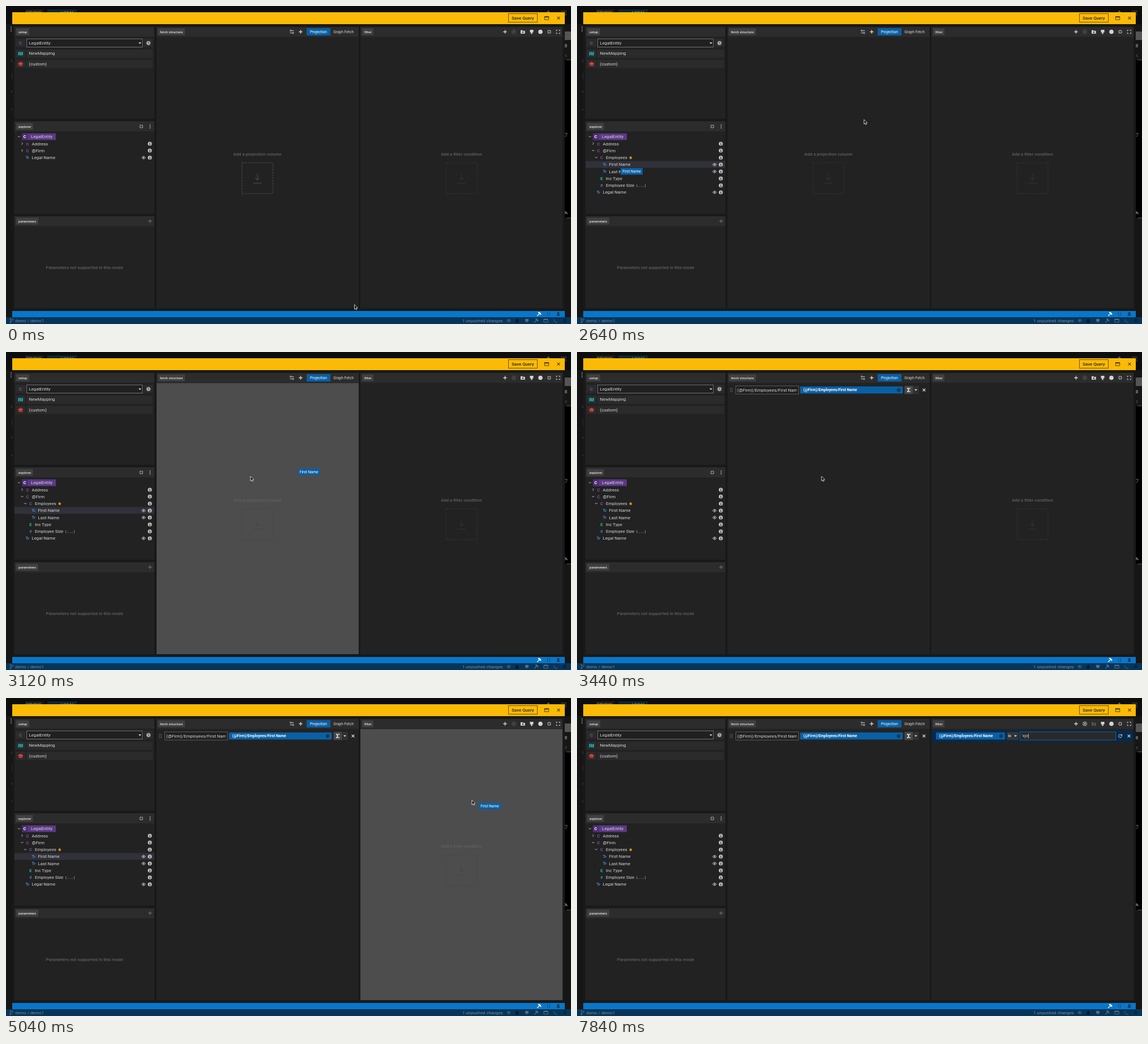
These frames come from a looping animation (998 by 561 pixels, 8 s). An HTML page:

```html
<!DOCTYPE html>
<html lang="en">
<head>
<meta charset="utf-8">
<title>Query builder</title>
<style>
html, body { margin: 0; width: 100%; height: 100%; overflow: hidden; background: #0d0d0d; }
svg { display: block; width: 998px; height: 561px; font: 7.8px Roboto, sans-serif; }
text { fill: #d6d6d6; white-space: pre; }
[class] { animation: none 8s step-end infinite; }

.s { font-size: 6.66px; }
.xs { font-size: 6.1px; font-weight: 500; fill: #e2e2e2; }
.m { font-weight: 500; }
.b { font-weight: 700; }
.mid { text-anchor: middle; }
.hint { fill: #606060; font-weight: 500; text-anchor: middle; }
.type { font-weight: 500; text-anchor: middle; }
.line { fill: none; stroke: currentColor; }
.mono { font: 6.1px "DejaVu Sans Mono", monospace; }

/* one percent is 80 ms */
.on10 { animation-name: on10; }
.on15 { animation-name: on15; }
.on42 { animation-name: on42; }
.on67 { animation-name: on67; }
.on76 { animation-name: on76; }
.on82 { animation-name: on82; }
.on88 { animation-name: on88; }
.on93 { animation-name: on93; }
.on95 { animation-name: on95; }
.on98 { animation-name: on98; }
.off10 { animation-name: off10; }
.off42 { animation-name: off42; }
.off67 { animation-name: off67; }
.off76 { animation-name: off76; }
.off82 { animation-name: off82; }
.at10to15 { animation-name: at10to15; }
@keyframes on10 { 0% { visibility: hidden } 10% { visibility: visible } }
@keyframes on15 { 0% { visibility: hidden } 15% { visibility: visible } }
@keyframes on42 { 0% { visibility: hidden } 42% { visibility: visible } }
@keyframes on67 { 0% { visibility: hidden } 67% { visibility: visible } }
@keyframes on76 { 0% { visibility: hidden } 76% { visibility: visible } }
@keyframes on82 { 0% { visibility: hidden } 82% { visibility: visible } }
@keyframes on88 { 0% { visibility: hidden } 88% { visibility: visible } }
@keyframes on93 { 0% { visibility: hidden } 93% { visibility: visible } }
@keyframes on95 { 0% { visibility: hidden } 95% { visibility: visible } }
@keyframes on98 { 0% { visibility: hidden } 98% { visibility: visible } }
@keyframes off10 { 10%, 100% { visibility: hidden } }
@keyframes off42 { 42%, 100% { visibility: hidden } }
@keyframes off67 { 67%, 100% { visibility: hidden } }
@keyframes off76 { 76%, 100% { visibility: hidden } }
@keyframes off82 { 82%, 100% { visibility: hidden } }
@keyframes at10to15 { 0%, 15%, 100% { visibility: hidden } 10% { visibility: visible } }

.types { animation-name: types; }
.legal { animation-name: legal; }
.hover { animation-name: hover; }
.dash { animation-name: dash; }
.over-fetch { animation-name: over-fetch; }
.over-filter { animation-name: over-filter; }
.tag { animation-name: tag; }
.pointer { animation-name: pointer; }
.arrow { animation-name: arrow; }
.hand { animation-name: hand; }
.ibeam { animation-name: ibeam; }
@keyframes types {
  0% { visibility: hidden; transform: translateY(-24.5px) }
  10% { visibility: visible; transform: translateY(-24.5px) }
  15% { visibility: visible; transform: none }
}
@keyframes legal {
  0% { transform: translateY(-61.2px) }
  10% { transform: translateY(-24.5px) }
  15% { transform: none }
}
@keyframes hover {
  0% { visibility: hidden }
  5% { visibility: visible; transform: translateY(-24.5px) }
  12% { visibility: visible; transform: translateY(-12.2px) }
  20%, 51% { visibility: visible; transform: none }
  42%, 67%, 100% { visibility: hidden; transform: none }
}
@keyframes dash { 0% { color: #404040 } 15%, 100% { color: #2f2f2f } }
@keyframes over-fetch {
  0%, 36%, 42%, 63%, 100% { visibility: hidden }
  34%, 39%, 60% { visibility: visible }
}
@keyframes over-filter {
  0%, 39%, 67%, 100% { visibility: hidden }
  36%, 63% { visibility: visible }
}
@keyframes tag {
  0%, 42%, 67%, 100% { visibility: hidden }
  29% { visibility: visible; transform: translate(77px, 286px) }
  34% { visibility: visible; transform: translate(402px, 227px) }
  35% { visibility: visible; transform: translate(518px, 206px) }
  36% { visibility: visible; transform: translate(652px, 190px) }
  37% { visibility: visible; transform: translate(672px, 190px) }
  38% { visibility: visible; transform: translate(632px, 197px) }
  39% { visibility: visible; transform: translate(515.5px, 205.5px) }
  40% { visibility: visible; transform: translate(444px, 224px) }
  58% { visibility: visible; transform: translate(95px, 288px) }
  60% { visibility: visible; transform: translate(305px, 249px) }
  61% { visibility: visible; transform: translate(652px, 210px) }
  63% { visibility: visible; transform: translate(835px, 185px) }
}
@keyframes pointer {
  0% { transform: translate(615px, 526.5px) }
  2% { transform: translate(250px, 404px) }
  4% { transform: translate(70px, 300px) }
  5% { transform: translate(11px, 262px) }
  6% { transform: translate(20px, 256px) }
  7% { transform: translate(27px, 253px) }
  11% { transform: translate(30px, 259px) }
  12% { transform: translate(33px, 264px) }
  19% { transform: translate(38px, 267px) }
  20% { transform: translate(46px, 274px) }
  21% { transform: translate(53px, 277px) }
  22% { transform: translate(59px, 279px) }
  23% { transform: translate(63px, 280px) }
  24% { transform: translate(65px, 280.5px) }
  29% { transform: translate(90px, 276px) }
  30% { transform: translate(160px, 262px) }
  31% { transform: translate(260px, 243px) }
  32% { transform: translate(390px, 222px) }
  33% { transform: translate(506.5px, 200px) }
  34% { transform: translate(580px, 190px) }
  35% { transform: translate(640px, 185px) }
  36% { transform: translate(660px, 185px) }
  37% { transform: translate(620px, 192px) }
  38% { transform: translate(504px, 200px) }
  39% { transform: translate(431.5px, 219px) }
  44% { transform: translate(420px, 224px) }
  45% { transform: translate(380px, 232px) }
  46% { transform: translate(320px, 244px) }
  47% { transform: translate(250px, 257px) }
  48% { transform: translate(180px, 270px) }
  49% { transform: translate(130px, 278px) }
  50% { transform: translate(105px, 281px) }
  52% { transform: translate(88px, 281px) }
  53% { transform: translate(84px, 281px) }
  57% { transform: translate(88px, 281px) }
  58% { transform: translate(300px, 246px) }
  59% { transform: translate(640px, 205px) }
  60% { transform: translate(822.5px, 180px) }
  68% { transform: translate(830px, 166px) }
  69% { transform: translate(850px, 130px) }
  70% { transform: translate(870px, 98px) }
  71% { transform: translate(877.5px, 84px) }
  74% { transform: translate(870px, 70px) }
  75% { transform: translate(864px, 67px) }
}
@keyframes arrow {
  0%, 26%, 57% { visibility: visible }
  7%, 50%, 74%, 100% { visibility: hidden }
}
@keyframes hand {
  0%, 26%, 57%, 100% { visibility: hidden }
  7%, 50% { visibility: visible }
}
@keyframes ibeam { 0%, 82%, 100% { visibility: hidden } 74% { visibility: visible } }
</style>
</head>
<body>
<svg viewBox="0 0 998 561">
<defs>
  <path id="right" class="line" d="M-1-2 1 0-1 2"/>
  <path id="down" class="line" d="M-2-1 0 1 2-1"/>
  <path id="plus" class="line" stroke-width="1.3" d="M-3.2 0H3.2M0-3.2V3.2"/>
  <path id="cross" class="line" stroke-width="1.2" d="M-2.4-2.4 2.4 2.4M2.4-2.4-2.4 2.4"/>
  <path id="caret" fill="currentColor" d="M-2.5-1.2H2.5L0 1.5z"/>
  <g id="info">
    <circle r="3.5" fill="currentColor"/>
    <path d="M-.9-.3H.4V1.8M-1 1.9H1.1M-.5-1.9H.5" fill="none" stroke="#222" stroke-width=".9"/>
  </g>
  <g id="eye" class="line" stroke-width=".9">
    <path d="M-3.5 0Q0-4.8 3.5 0Q0 4.8-3.5 0z"/><circle r="1" fill="currentColor"/>
  </g>
  <g id="act"><use href="#eye" x="243"/><use href="#info" x="254"/></g>
  <g id="string" fill="#4688cf">
    <path d="M-3.2-2.5H1V-1.5H-.6V2.6H-1.7V-1.5H-3.2z"/><path d="M.7-.6H1.7V0Q2.2-.7 3.2-.6V.4Q1.8.3 1.8 1.4V2.6H.7z"/>
  </g>
  <g id="compress" class="line"><path d="M-3.3-1.2H-1.2V-3.3M3.3-1.2H1.2V-3.3M-3.3 1.2H-1.2V3.3M3.3 1.2H1.2V3.3"/></g>
  <g id="hammer" class="line"><path stroke-width="1.3" d="M-3.2 3.3 1.4-1.4"/><path stroke-width="2.2" d="M-1.4-2.4Q1-3.6 3.3 1"/></g>
  <g id="window"><path class="line" d="M-3.7-2.7H3.7V2.8H-3.7z"/><path fill="currentColor" d="M-3.7-3H3.7V-1H-3.7z"/></g>
  <path id="reload" class="line" d="M2.1-1.8A2.8 2.8 0 1 0 2.8.5M3-3.2V-.9H.7"/>
  <path id="robot" fill="currentColor" d="M-3 3Q-3 .6-1.5.4Q-3-3.4 0-3.4T1.5.4Q3 .6 3 3z"/>
  <g id="drop">
    <rect class="line" x="-27" y="15.5" width="54.5" height="54.5" stroke-width="1.5" stroke-dasharray="3.3 1.7"/>
    <path class="line" stroke-width="1.5" d="M0 34.5V46M-4 42 0 46 4 42M-7.5 51.5H7.5"/>
  </g>
  <clipPath id="name-clip"><rect x="281" y="60" width="107.4" height="14"/></clipPath>
</defs>

<!-- dimmed page behind -->
<g color="#62696f">
  <path fill="#1c1c1c" d="M34 6H66V11H34z"/><path fill="#08263c" d="M73 6H125V11H73z"/>
  <text x="35" y="14.4" class="b" style="fill:#777">STUDIO</text>
  <text x="97" y="14.4" class="b" style="fill:#777">LOCAL</text>
  <path fill="#161616" d="M0 32H11V549H0zM987 32H998V549H987z"/>
  <path fill="#777" d="M8 36h2v2H8zM8 39.5h2v2H8zM8 43h2v2H8z"/>
  <path fill="#2d2d2d" d="M9 94h2v5H9zM10 118h1v11h-1zM9 149h2v4H9zM9 181h2v3H9z"/>
  <path fill="#5a5a5a" d="M955 11 958 7.5 961 11zM980 8.5H990V9.5H980zM980 11.7H990V12.7H980zM980 15H990V16H980z"/>
  <path fill="#555" d="M987 45H998V60H987z"/>
  <path fill="#000" d="M987 95H998V374H987z"/>
  <path fill="#5a5a5a" d="M987 67h4v6h-4zM990 94.5h8v1h-8zM990 373.5h8v1h-8z"/>
  <path class="line" d="M990.5 85 988 87.5 990.5 90"/>
  <use href="#reload" x="988" y="227"/><use href="#hammer" x="988" y="366"/>
  <path fill="#06355a" d="M0 549H998V561H0z"/>
  <g class="line" stroke-width=".9">
    <circle cx="8" cy="552.2" r="1.2"/><circle cx="8" cy="558" r="1.2"/><circle cx="11.7" cy="553.2" r="1.2"/>
    <path d="M8 553.5V556.8M11.7 554.5Q11.5 556 8 556.5"/>
  </g>
  <text x="16" y="557.8" style="fill:#82898f">demo / demo1</text>
  <text x="806" y="557.8" style="fill:#82898f">1 unpushed changes</text>
  <use href="#eye" x="888" y="555"/>
  <path fill="#0b1a26" d="M903 551Q909 559 903 559T903 551z"/>
  <path fill="currentColor" d="M917 552H923V556.5H921.5L920 558.5 918.5 556.5H917z"/>
  <use href="#hammer" x="936.5" y="555"/><use href="#window" x="953.5" y="555"/>
  <path class="line" stroke="#0b2338" d="M967 552.5 969.5 555 967 557.5M970 558H974"/>
  <use href="#robot" x="987" y="555" color="#0b2338"/>
</g>

<!-- dialog -->
<path fill="#191919" d="M11 32H987V538H11z"/>
<path fill="#fbba05" d="M11 11H987V32H11z"/>
<path fill="#0877ca" d="M11 538H987V549H11z"/>
<rect x="887.5" y="13.5" width="51" height="15" fill="none" stroke="#6b5410"/>
<text x="913" y="24" class="m mid" style="fill:#2b2410">Save Query</text>
<g color="#544107"><use href="#window" x="955" y="21.3"/><use href="#cross" x="976" y="21.3"/></g>
<use href="#hammer" x="941.5" y="543.5" color="#fff"/>
<text x="958.5" y="546" class="s mid" style="fill:#0c3b63">{ }</text>
<use href="#robot" x="975.5" y="543.5" color="#0c3b63"/>

<path fill="#222" d="M15 37H262V199H15zM15 203H262V366.500H15zM15 370.500H262V533H15zM266 37H623V533H266zM626 37H983V533H626z"/>
<path fill="#2c2c2c" d="M15 37H262V54H15zM15 203.500H262V221H15zM15 371H262V388.500H15zM266 37H623V54.500H266zM626 37H983V54.500H626z"/>
<path fill="#404040" d="M18 39.500H41V51.500H18zM18 206.500H47.500V218.500H18zM18 373.500H57V385.500H18zM268.500 39.500H316V51.500H268.500zM629 39.500H649V51.500H629z"/>
<g class="xs">
  <text x="22" y="47.500" class="xs">setup</text>
  <text x="22" y="214.500" class="xs">explorer</text>
  <text x="22" y="381.500" class="xs">parameters</text>
  <text x="272" y="47.500" class="xs">fetch structure</text>
  <text x="633" y="47.500" class="xs">filter</text>
</g>

<!-- setup -->
<path fill="#2b2b2b" d="M17 58H34V72H17zM17 77H34V91H17zM17 95H34V109H17zM36 77H259.500V91.500H36zM36 95H259.500V109.500H36zM244 58H259.500V72.500H244z"/>
<rect x="36.500" y="58" width="204.500" height="14.500" fill="#202020" stroke="#737373"/>
<text x="25.500" y="67.800" class="type" style="fill:#8a55bd">C</text>
<text x="40.500" y="68">LegalEntity</text><use href="#caret" x="236.500" y="65.500" color="#ddd"/>
<text x="40.500" y="86.400">NewMapping</text><text x="40.500" y="104.600">(custom)</text>
<path fill="#18a3a8" d="M21.500 81.500 24 80.500V86.500L21.500 87.500zM24.500 80.500 27 81.500V87.500L24.500 86.500zM27.500 81.500 30 80.500V86.500L27.500 87.500z"/>
<path fill="#e03c3c" d="M21.500 102Q21.500 99.500 24 100Q25 97.500 27.500 99.500Q30 100 30 103H21.500zM22.500 103.500H29V105.500H22.500z"/>
<circle cx="251.700" cy="65.300" r="3.600" fill="#a8a8a8"/><path d="M251.700 63V65.500L253.300 66.500" fill="none" stroke="#2b2b2b" stroke-width=".8"/>

<!-- explorer -->
<g color="#bcbcbc"><use href="#compress" x="239" y="212.500"/><path fill="currentColor" d="M253.800 209h1.500v1.500h-1.500zM253.800 211.800h1.500v1.500h-1.500zM253.800 214.600h1.500v1.500h-1.500z"/></g>
<rect class="hover" x="15" y="273.400" width="247" height="12.200" fill="#31313a"/>
<g color="#c4c4c4">
  <use href="#down" x="23" y="230.500"/>
  <path fill="#5c3886" d="M28 224.800H88V236.500H28z"/><path fill="#4c2d72" d="M28 224.800H38.500V236.500H28z"/>
  <text x="33" y="233.300" class="b mid" style="fill:#fff">C</text>
  <text x="44" y="233.300">LegalEntity</text>

  <use href="#right" x="28.500" y="242.700"/><text x="38" y="245.500" class="type" style="fill:#8a55bd">C</text>
  <text x="45.500" y="245.500">Address</text><use href="#info" x="254" y="243"/>

  <use href="#right" x="28.500" y="255" class="off10"/><use href="#down" x="28.500" y="255" class="on10"/>
  <text x="38" y="257.700" class="type" style="fill:#8a55bd">C</text>
  <text x="45.500" y="257.700">@Firm</text><use href="#info" x="254" y="255"/>

  <use href="#right" x="34" y="267.200" class="at10to15"/><use href="#down" x="34" y="267.200" class="on15"/>
  <g class="on10">
    <text x="43.500" y="270" class="type" style="fill:#8a55bd">C</text><text x="51" y="270">Employees</text>
    <path fill="#d9a514" d="M94.800 264.300 95.700 266.500 98 266.700 96.200 268.200 96.800 270.400 94.800 269.200 92.800 270.400 93.400 268.200 91.600 266.700 93.900 266.500z"/>
    <use href="#info" x="254" y="267.500"/>
  </g>
  <g class="on15">
    <use href="#string" x="49" y="279.500"/><text x="56.500" y="282.300">First Name</text><use href="#act" y="279.800"/>
    <use href="#string" x="49" y="291.700"/><text x="56.500" y="294.500">Last Name</text><use href="#act" y="292"/>
  </g>
  <g class="types">
    <text x="43.500" y="306.800" class="b mid" style="fill:#1fb894">E</text><text x="51" y="306.800">Inc Type</text><use href="#info" x="254" y="304.200"/>
    <text x="43.500" y="319" class="type" style="fill:#4688cf">#</text><text x="51" y="319">Employee Size</text>
    <text x="104" y="318.700" class="mono">(...)</text><use href="#info" x="254" y="316.400"/>
  </g>
  <g class="legal"><use href="#string" x="38" y="328.400"/><text x="45.500" y="331.200">Legal Name</text><use href="#act" y="328.700"/></g>
</g>

<!-- parameters -->
<use href="#plus" x="254.500" y="379.500" color="#666"/>
<text x="138.700" y="463.700" class="hint">Parameters not supported in this mode</text>

<!-- fetch structure -->
<g color="#d4d4d4">
  <g class="line" stroke-width=".9"><circle cx="503" cy="43.500" r="1.300"/><circle cx="507" cy="47.500" r="1.300"/><path d="M504.500 43.500H508.500M501.500 47.500H505.500"/></g>
  <use href="#plus" x="520.500" y="45.500"/>
  <path fill="#0a5fa3" d="M531 39H573V52H531z"/>
  <text x="552" y="47.900" class="s mid" style="fill:#fff">Projection</text><text x="596.200" y="47.900" class="s mid">Graph Fetch</text>
</g>
<g class="dash"><use href="#drop" x="444" y="261" class="off42"/></g>
<path class="over-fetch" fill="#4d4d4d" d="M266 55H623V533H266z"/>
<use class="over-fetch" href="#drop" x="444" y="261" color="#484848"/>
<text x="444" y="263.500" class="hint off42">Add a projection column</text>
<g class="on42">
  <path fill="#6b6b6b" d="M270.500 63.500h1.400v1.400h-1.400zM273.300 63.500h1.400v1.400h-1.400zM270.500 66.300h1.400v1.400h-1.400zM273.300 66.300h1.400v1.400h-1.400zM270.500 69.100h1.400v1.400h-1.400zM273.300 69.100h1.400v1.400h-1.400z"/>
  <rect x="280.500" y="59.800" width="111" height="14.400" fill="#202020" stroke="#5c5c5c"/>
  <g clip-path="url(#name-clip)"><text x="283" y="69.600">(@Firm)/Employees/First Name</text></g>
  <rect x="394" y="60.700" width="181.500" height="12.600" rx="1" fill="#0a60a5"/>
  <text x="399.800" y="69.300" class="s b" style="fill:#fff">(@Firm)/Employees/First Name</text>
  <use href="#info" x="568" y="67" color="#0a4373"/>
  <path fill="#474747" d="M578.500 59.800H593V74.200H578.500z"/><path fill="#303030" d="M593 59.800H604V74.200H593z"/>
  <path fill="none" stroke="#fff" stroke-width="1.200" d="M588.300 65V64H583.700L586.300 67 583.700 70H588.300V69"/>
  <use href="#caret" x="598.500" y="67" color="#ddd"/><use href="#cross" x="613" y="67" color="#e6e6e6"/>
</g>

<!-- filter -->
<g color="#d4d4d4">
  <use href="#plus" x="881.500" y="45.500"/>
  <g class="off76" color="#585858"><circle class="line" cx="897" cy="45.500" r="3.400"/><path class="line" d="M895.200 45.500H898.800M897 43.700V47.300"/></g>
  <g class="on76"><circle class="line" cx="897" cy="45.500" r="3.400"/><path class="line" d="M895.200 45.500H898.800M897 43.700V47.300"/></g>
  <path class="off76" fill="#d4d4d4" d="M909 42.700H912L913 43.700H916.700V48.700H909z"/>
  <path class="on76" fill="#585858" d="M909 42.700H912L913 43.700H916.700V48.700H909z"/>
  <path fill="none" stroke="#2c2c2c" d="M911.300 46.200H914.500M912.900 44.600V47.800"/>
  <path fill="currentColor" d="M925.500 42H931.500V46.500H929.700V49.300H927.300V46.500H925.500z"/>
  <circle cx="944" cy="45.500" r="3.800" fill="currentColor"/>
  <use href="#compress" x="959.500" y="45.500"/>
  <path class="line" d="M972.200 44.300V42.500H974M976.500 42.500H978.300V44.300M978.300 46.700V48.500H976.500M974 48.500H972.200V46.700"/>
</g>
<use href="#drop" x="804.500" y="261" color="#2f2f2f" class="off67"/>
<path class="over-filter" fill="#4d4d4d" d="M626 55H983V533H626z"/>
<use class="over-filter" href="#drop" x="804.500" y="261" color="#484848"/>
<text x="804.500" y="263.500" class="hint off67">Add a filter condition</text>
<path class="on76" fill="#07294a" d="M626 57H983V77H626z"/>
<g class="on67" color="#dcdcdc">
  <rect x="634" y="60.700" width="122" height="12.600" rx="1" fill="#0a60a5"/>
  <text x="639.800" y="69.300" class="s b" style="fill:#fff">(@Firm)/Employees/First Name</text>
  <use href="#info" x="749" y="67" color="#0a4373"/>
  <path fill="#343434" d="M759 60H780V74H759z"/><text x="761.500" y="69.300" class="s b">is</text><use href="#caret" x="774.500" y="67"/>
  <path fill="#2b2b2b" d="M782 60H951.500V74H782z"/>
  <use href="#reload" x="959.500" y="67"/><use href="#cross" x="975" y="67"/>
</g>
<rect class="on76" x="782.500" y="59.800" width="169" height="14.400" fill="#2c2825" stroke="#0a62a8"/>
<g class="off82"><text x="785.500" y="69.300" class="s on67" style="fill:#858585" id="empty">(empty)</text></g>
<rect class="on82" x="784" y="61" width="30" height="12" fill="#2c2825"/>
<text x="785.800" y="69.300" class="s"><tspan class="on82">'</tspan><tspan class="on88">x</tspan><tspan class="on93">y</tspan><tspan class="on95">z</tspan></text>
<path class="on98" fill="#e0e0e0" d="M797.300 63H798V71H797.300z"/>

<!-- dragged label and pointer -->
<g class="tag">
  <rect width="39" height="11.500" fill="#0a60a5"/><text x="19.500" y="8.100" class="s mid" style="fill:#fff">First Name</text>
</g>
<g class="pointer">
  <path class="arrow" fill="#000" stroke="#fff" stroke-width=".8" d="M.5.3V8.200L2.300 6.600 3.500 9.300 4.900 8.700 3.700 6.100H6.200z"/>
  <path class="hand" fill="#fff" stroke="#111" stroke-width=".7" d="M-.8.800Q0 0 .6.800V3.500Q1.500 3 2 3.800Q3 3.500 3.200 4.200Q4.500 4 4.500 5.200V7Q4.300 9.500 2 9.500H.8Q-.6 9.200-1.400 7.300L-2.700 5.500Q-2.300 4.500-.8 5.800z"/>
  <path class="ibeam" fill="none" stroke="#ddd" stroke-width=".8" d="M-2-4.500Q0-4.500 0-3Q0-4.500 2-4.500M0-3V4M-2 5.500Q0 5.500 0 4Q0 5.500 2 5.500"/>
</g>
</svg>
</body>
</html>
```
